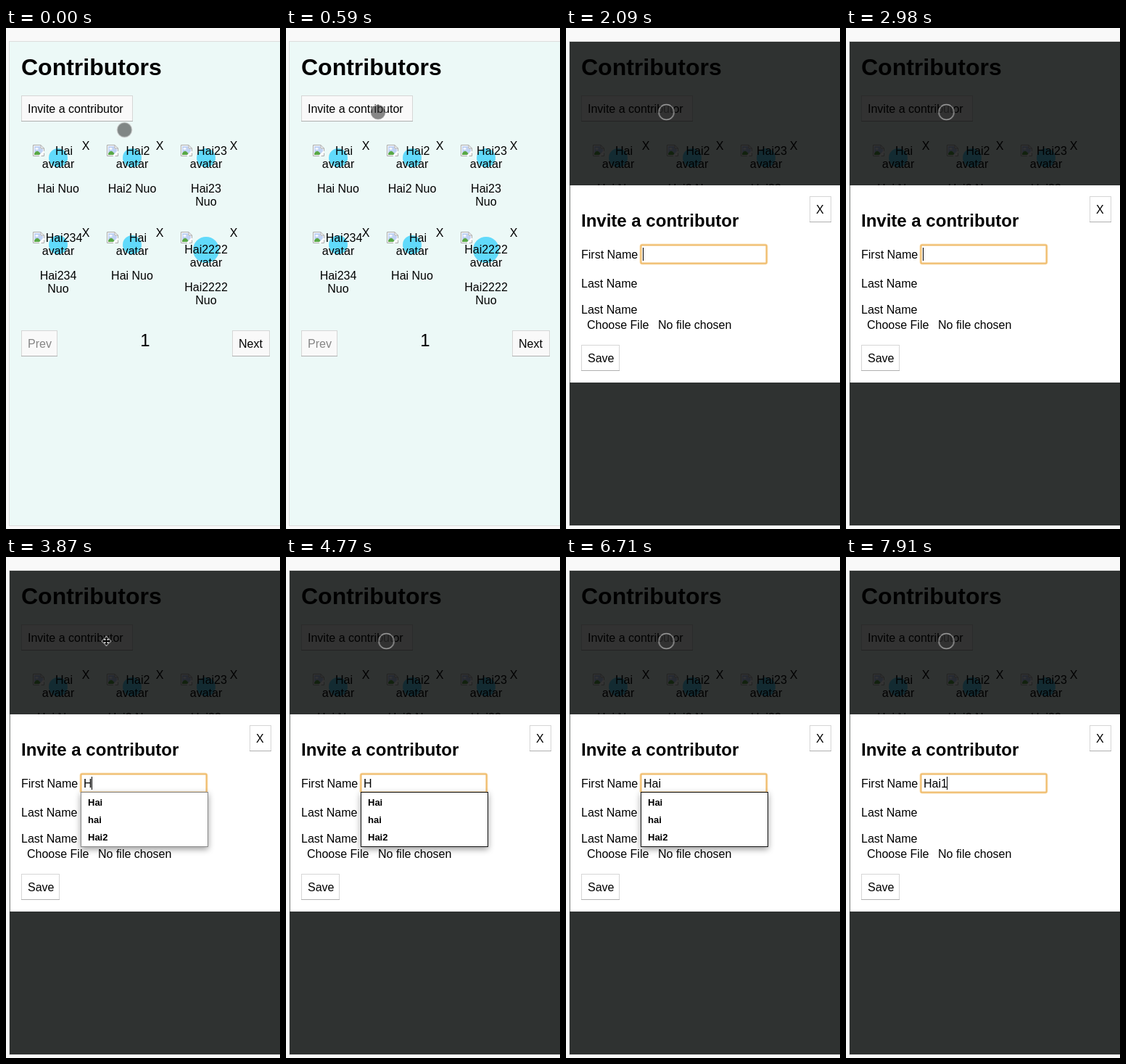
Write an HTML page that moves like this. It is 378 by 691 pixels and loops after 8000 ms.

```html
<!DOCTYPE html>
<html lang="en">
<head>
<meta charset="utf-8">
<title>Contributors</title>
<style>
html, body { margin: 0; width: 100%; height: 100%; overflow: hidden; background: #f9f9f9; }
svg { display: block; width: 378px; height: 691px; font: 16px "Liberation Sans", Arial, sans-serif; }
text { white-space: pre; }
.mid { text-anchor: middle; }
.h1 { font-size: 32px; font-weight: bold; }
.h2 { font-size: 24px; font-weight: bold; }
.option { font-size: 13px; font-weight: bold; }

.anim { animation: 8s step-end infinite; }
.modal { animation-name: open; }
.list { animation-name: list; filter: drop-shadow(0 3px 4px rgba(0, 0, 0, .4)); }
.frame { animation-name: darken; }
.typed1 { animation-name: typed1; }
.typed2 { animation-name: typed2; }
.typed3 { animation-name: typed3; }
.caret-pos { animation-name: caret-pos; }
.caret { animation-name: blink; }
.pointer { animation-name: glide; }
.dot { animation-name: dot; }
.arrows { animation-name: arrows; }

@keyframes open { 0% { visibility: hidden } 26.125% { visibility: visible } }
@keyframes typed1 { 0% { visibility: hidden } 44.75% { visibility: visible } }
@keyframes typed2 { 0% { visibility: hidden } 65.125% { visibility: visible } }
@keyframes typed3 { 0% { visibility: hidden } 97% { visibility: visible } }
@keyframes list {
  0% { opacity: 0 } 46.625% { opacity: .6 } 48.375% { opacity: 1 }
  97% { opacity: .5 } 98.875% { opacity: 0 }
}
@keyframes darken { 0% { stroke: #888 } 59.625% { stroke: #111 } }
@keyframes blink {
  0% { opacity: 1 } 31.625% { opacity: 0 } 37.25% { opacity: 1 }
  54% { opacity: 0 } 61.5% { opacity: 1 } 72.625% { opacity: 0 }
  78.25% { opacity: 1 } 83.875% { opacity: 0 } 91.375% { opacity: 1 }
}
@keyframes caret-pos {
  0% { transform: translateX(106px) } 44.75% { transform: translateX(118px) }
  65.125% { transform: translateX(130px) } 97% { transform: translateX(139px) }
}
@keyframes glide {
  0% { transform: translate(163.5px, 140.5px) }
  1.875% { transform: translate(152px, 133px) }
  3.75% { transform: translate(140px, 125px) }
  5.5% { transform: translate(131px, 119px) }
  7.375% { transform: translate(127px, 116px) }
  11.125% { transform: translate(132px, 116px) }
  13% { transform: translate(140px, 116px) }
  14.875% { transform: translate(138.5px, 116px) }
}
@keyframes dot { 0% { opacity: 1 } 46.625% { opacity: 0 } 54% { opacity: 1 } }
@keyframes arrows { 0% { opacity: 0 } 46.625% { opacity: 1 } 54% { opacity: 0 } }
</style>
</head>
<body>
<svg viewBox="0 0 378 691">
  <defs>
    <g id="broken">
      <path d="M.5 .5H11L15.5 5V15.5H.5Z" fill="#fff" stroke="#a9a9a9"/>
      <path d="M2 2H10.500V5.500H14V9L9 14H2Z" fill="#c1d3f4"/>
      <path d="M2 14V12Q5 7 8 9.500L10.500 12 9 14Z" fill="#5aa846"/>
      <ellipse cx="5.500" cy="5.500" rx="2.200" ry="1.300" fill="#fff"/>
      <path d="M16 8.500 8.500 16H11L16 11Z" fill="#fff"/>
      <path d="M11 .5V5H15.500" fill="none" stroke="#a9a9a9"/>
    </g>
  </defs>

  <rect x="4.500" y="18.500" width="400" height="668" fill="#ecf9f7" stroke="#ddd"/>
  <text class="h1" x="21" y="65">Contributors</text>
  <g id="page"></g>
  <text class="mid" x="192" y="439" font-size="24">1</text>

  <g class="anim modal">
    <rect x="5" y="19" width="373" height="667" fill="#000" fill-opacity=".8"/>
    <rect x="5" y="217" width="373" height="272" fill="#8a8c8b"/>
    <rect x="6" y="217" width="372" height="272" fill="#fff"/>
    <text class="h2" x="21" y="274">Invite a contributor</text>
    <g id="actions"></g>
    <text x="21" y="318">First Name</text>
    <text x="21" y="358">Last Name</text>
    <text x="21" y="394">Last Name</text>
    <text x="29" y="415">Choose File</text>
    <text x="127" y="415">No file chosen</text>

    <rect x="103.500" y="299.500" width="173" height="25" rx="2" fill="none" stroke="#f9dfb4" stroke-width="4"/>
    <rect x="103.500" y="299.500" width="173" height="25" rx="1" fill="#fff" stroke="#efbb6b" stroke-width="2"/>
    <text x="107" y="318"><tspan class="anim typed1">H</tspan><tspan class="anim typed2">ai</tspan><tspan class="anim typed3">1</tspan></text>
    <g class="anim caret-pos"><rect class="anim caret" y="303" width="1" height="18"/></g>

    <g class="anim list">
      <rect class="anim frame" x="103.500" y="324.500" width="175" height="75" fill="#fff"/>
      <text class="option" x="113" y="343">Hai</text>
      <text class="option" x="113" y="367">hai</text>
      <text class="option" x="113" y="391">Hai2</text>
    </g>
  </g>

  <g class="anim pointer">
    <circle class="anim dot" r="10.500" fill="#323232" fill-opacity=".58" stroke="#fff" stroke-opacity=".5" stroke-width="1.500"/>
    <path class="anim arrows" d="M0-6 2.500-3H1V-1H3V-2.500L6 0 3 2.500V1H1V3H2.500L0 6-2.500 3H-1V1H-3V2.500L-6 0-3-2.500V-1H-1V-3H-2.500Z" stroke="#ddd" stroke-width="1.600" paint-order="stroke"/>
  </g>
</svg>
<script>
const label = (x, y, s, cls = "mid") => `<text class="${cls}" x="${x}" y="${y}">${s}</text>`;

const button = (x, y, w, s, color = "#000", fill = "#f9f9f9") =>
  `<rect x="${x + .5}" y="${y + .5}" width="${w - 1}" height="35" fill="${fill}" stroke="#d6d6d6"/>
   <path d="M${x} ${y + 35.5}h${w}" stroke="#b0b0b0"/>
   <text x="${x + 9}" y="${y + 24}" fill="${color}">${s}</text>`;

// A long first name drops below the broken-image icon.
function card(name, i) {
  const x = 72 + i % 3 * 102, y = 161 + Math.floor(i / 3) * 120;
  const tall = name.length > 6, drop = tall ? 16 : 0;
  const full = name.length > 4
    ? label(x, y + 66 + drop, name) + label(x, y + 84 + drop, "Nuo")
    : label(x, y + 66, name + " Nuo");
  return `<circle cx="${x}" cy="${y + (tall ? 25 : 18)}" r="${tall ? 18 : 13}" fill="#61dafb"/>
    <use href="#broken" x="${x - 35}" y="${y}"/>` +
    label(tall ? x : x + 8, y + 14 + drop, name) +
    label(x, y + 32 + drop, "avatar") + full +
    label(x + 38, y + 7, "X");
}

const names = ["Hai", "Hai2", "Hai23", "Hai234", "Hai", "Hai2222"];
document.getElementById("page").innerHTML =
  button(21, 93, 154, "Invite a contributor") +
  names.map(card).join("") +
  button(21, 417, 50, "Prev", "#858585") +
  button(312, 417, 52, "Next");
document.getElementById("actions").innerHTML =
  button(336, 232, 30, "X", "#000", "#fff") +
  button(21, 437, 53, "Save", "#000", "#fff");
</script>
</body>
</html>
```
